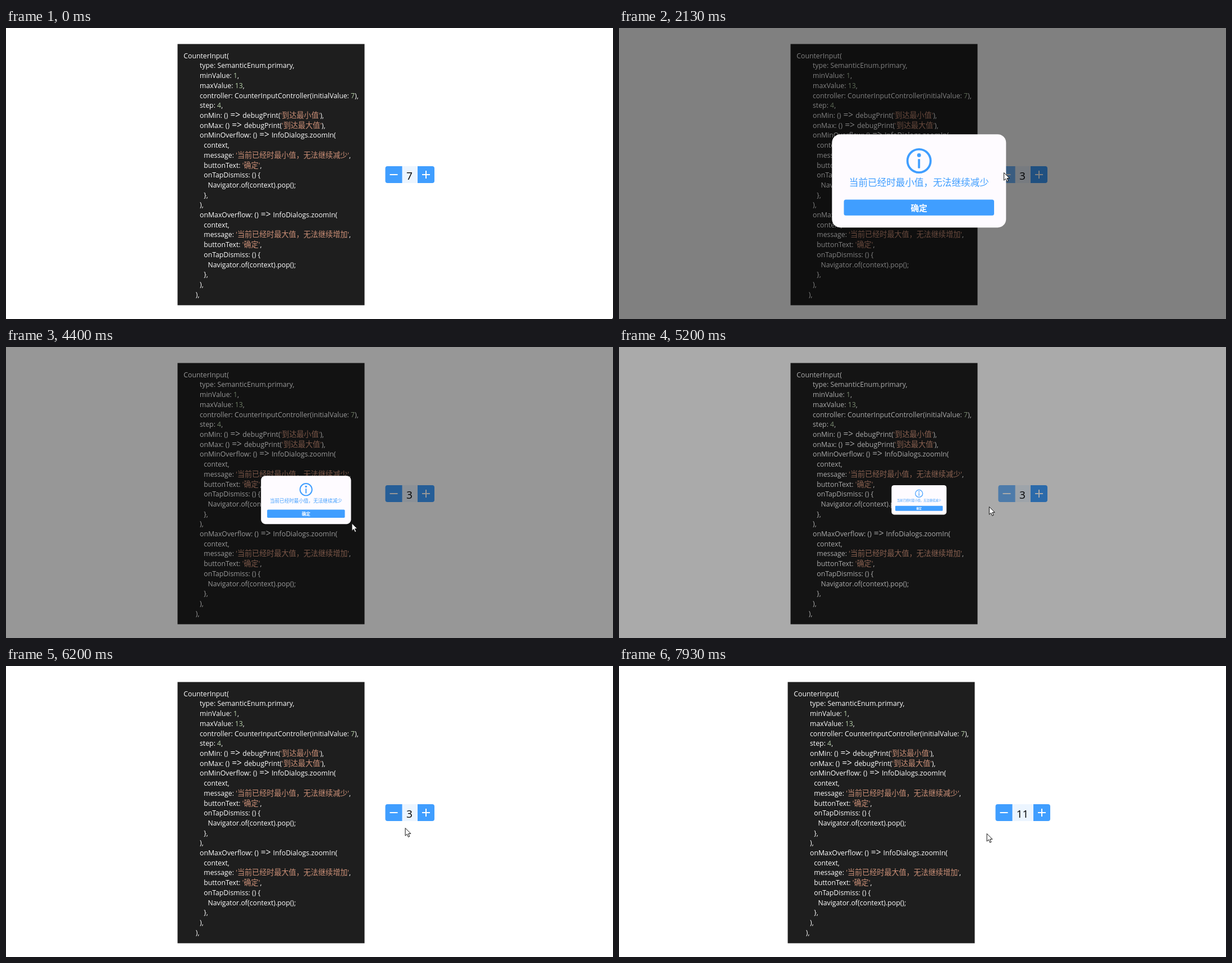
Animation of 1081 by 518 pixels, one loop 8000 ms. Source, as an HTML page with a canvas:

```html
<!DOCTYPE html>
<html lang="zh-CN">
<head>
<meta charset="utf-8">
<title>CounterInput</title>
<style>
  html, body { margin: 0; width: 100%; height: 100%; overflow: hidden; background: #fff; }
  canvas { display: block; }
</style>
</head>
<body>
<canvas id="stage" width="1081" height="518"></canvas>
<script>
const ctx = document.getElementById('stage').getContext('2d');
const LOOP = 8000, FADE = 200;
const BLUE = '#409eff', LATIN = '"Open Sans", sans-serif';
const CJK = '"Noto Sans CJK SC", "Noto Sans CJK", sans-serif';
const MIN_TEXT = '当前已经时最小值，无法继续减少';
const MAX_TEXT = '当前已经时最大值，无法继续增加';

const overflowCode = (name, message) => `        ${name}: () => InfoDialogs.zoomIn(
          context,
          message: '${message}',
          buttonText: '确定',
          onTapDismiss: () {
            Navigator.of(context).pop();
          },
        ),`;
const code = `CounterInput(
        type: SemanticEnum.primary,
        minValue: 1,
        maxValue: 13,
        controller: CounterInputController(initialValue: 7),
        step: 4,
        onMin: () => debugPrint('到达最小值'),
        onMax: () => debugPrint('到达最大值'),
${overflowCode('onMinOverflow', MIN_TEXT)}
${overflowCode('onMaxOverflow', MAX_TEXT)}
      ),`.split('\n');

// Token styles: pattern, font, color; the last one is the fallback.
const tokenStyles = [
  [/^[\u4e00-\u9fff]/, '13.1px ' + CJK, '#ce9178'],
  [/^'/, '12.3px ' + LATIN, '#ce9178'],
  [/^\d/, '12.3px ' + LATIN, '#b5cea8'],
  [/^ =>/, '15.5px ' + LATIN, '#fff'],
  [/^/, '12.3px ' + LATIN, '#fff'],
];

const dialogs = [
  { open: 1870, close: 2260, message: MIN_TEXT },
  { open: 3360, close: 4302, message: MIN_TEXT },
  { open: 5122, close: 5930, message: MIN_TEXT },
  { open: 7230, close: 7670, message: MAX_TEXT },
];
const taps = {
  minus: [1670, ...dialogs.slice(0, 3).map(d => d.open)],
  plus: [6800, 7000, dialogs[3].open],
};

// Pointer trips: each leaves the previous place at start and reaches its own at end.
const corner = [1080, 516], overCode = [557, 227], below = [685, 270];
const minus = [685, 257], plus = [748, 262], ok = [540, 318];
const trips = [
  { start: 0, end: 0, place: corner },
  { start: 50, end: 600, place: overCode },
  { start: 500, end: 1130, place: minus },
  { start: 2130, end: 2300, place: ok },
  { start: 2500, end: 3470, place: minus },
  { start: 3400, end: 3870, place: ok },
  { start: 4200, end: 5120, place: minus },
  { start: 5150, end: 5930, place: ok },
  { start: 5930, end: 6550, place: plus },
  { start: 7230, end: 7600, place: ok },
  { start: 7670, end: 8310, place: below },
];
const SAG = 27;

const clamp = v => Math.max(0, Math.min(1, v));
const lerp = (a, b, u) => a + (b - a) * u;
const easeOut = v => 1 - (1 - v) ** 3;

function bezier(x1, y1, x2, y2) {
  const at = (a, b, s) => 3 * a * s * (1 - s) ** 2 + 3 * b * s * s * (1 - s) + s ** 3;
  return x => {
    let low = 0, high = 1;
    for (let i = 0; i < 20; i++) {
      const mid = (low + high) / 2;
      if (at(x1, x2, mid) < x) low = mid; else high = mid;
    }
    return at(y1, y2, low);
  };
}
const ease = bezier(.25, .1, .25, 1), easeInOut = bezier(.42, 0, .58, 1);

function box(x, y, w, h, color, radius = 0) {
  ctx.fillStyle = color;
  ctx.beginPath();
  ctx.roundRect(x, y, w, h, radius);
  ctx.fill();
}

function label(text, x, y, font, color, align = 'center') {
  ctx.font = font;
  ctx.fillStyle = color;
  ctx.textAlign = align;
  ctx.fillText(text, x, y);
}

function drawCode() {
  box(305.5, 28.5, 333, 465, '#1e1e1e');
  code.forEach((line, row) => {
    const text = line.trimStart();
    let x = 316.2 + (line.length - text.length) * 3.6;
    for (const token of text.split(/(\d+|'|[\u4e00-\u9fff，]+| => )/)) {
      const [, font, color] = tokenStyles.find(([pattern]) => pattern.test(token));
      label(token, x, 53.7 + row * 17.71, font, color, 'left');
      x += ctx.measureText(token).width;
    }
  });
}

const tapGlow = (times, t) =>
  Math.max(0, ...times.map(tap => t < tap ? 0 : .27 * clamp((550 - t + tap) / 300)));

function drawCounter(value, t) {
  const half = value > 9 ? 48.75 : 43.75, left = 719.25 - half, right = 719.25 + half;
  const button = (x, corners, times) => {
    box(x, 246, 30, 30, BLUE, corners);
    box(x, 246, 30, 30, `rgba(255,255,255,${tapGlow(times, t)})`, corners);
    box(x + 8, 260, 14, 2, '#fff');
  };
  box(left + 29, 246, 2 * half - 58, 30, '#ecf5ff');
  button(left, [4, 0, 0, 4], taps.minus);
  button(right - 30, [0, 4, 4, 0], taps.plus);
  box(right - 16, 254, 2, 14, '#fff');
  label(value, 718.5, 270, '19px ' + LATIN, '#000');
}

function drawDialog({ open, close, message }, t) {
  const progress = clamp(Math.min(t - open, close + FADE - t) / FADE);
  box(0, 0, 1081, 518, `rgba(0,0,0,${ease(progress) / 2})`);
  const scale = easeInOut(progress);
  ctx.save();
  ctx.translate(534.3, 272.2);
  ctx.scale(scale, scale);
  box(-155, -83, 310, 166, '#fefbff', 15);
  ctx.strokeStyle = BLUE;
  ctx.lineWidth = 3.8;
  ctx.beginPath();
  ctx.arc(0, -35.7, 20.6, 0, 7);
  ctx.stroke();
  box(-3.4, -49.2, 6.8, 6.8, BLUE, 3.4);
  box(-1.9, -39, 3.8, 16.5, BLUE, 1);
  label(message, 0, 9, '16.6px ' + CJK, BLUE);
  box(-133.8, 33.3, 267.5, 28.2, BLUE, 3.5);
  label('确定', 0, 53.3, 'bold 14.8px ' + CJK, '#fff');
  ctx.restore();
}

const arrowShape = new Path2D('M.5 .5V14.2L3.7 11.2L5.9 16.4L8.2 15.4L6 10.4H10.3Z');
const handShape = new Path2D('M-1.5 1.6Q0 -.4 1.5 1.6V7.2Q3.4 6 4.4 7.8Q6.4 6.8 7.3 8.5' +
  'Q9.8 7.8 10 10.4V14Q9.8 17 8.2 19.5H0Q-1.2 16.8 -4.6 12.6Q-5 10 -2.9 10.4L-1.5 12Z');

function pointerAt(t) {
  const i = Math.max(1, trips.findLastIndex(trip => t >= trip.start));
  const { start, end, place: [x1, y1] } = trips[i];
  const [x0, y0] = trips[i - 1].place;
  const u = easeOut(clamp((t - start) / (end - start)));
  return [lerp(x0, x1, u), lerp(y0, y1, u) + SAG * 4 * u * (1 - u)];
}

function drawPointer(t, dialog) {
  const [x, y] = pointerAt(t);
  const inside = (left, top, right, bottom) => x >= left && x <= right && y >= top && y <= bottom;
  const hand = dialog ? t < dialog.close && inside(400, 305, 668, 334)
    : inside(675, 246, 706, 276) || inside(733, 246, 768, 276);
  const shape = hand ? handShape : arrowShape;
  ctx.save();
  ctx.translate(x, y);
  ctx.fillStyle = '#fff';
  ctx.strokeStyle = '#111';
  ctx.lineWidth = 1;
  ctx.lineJoin = 'round';
  ctx.fill(shape);
  ctx.stroke(shape);
  if (hand) {
    ctx.beginPath();
    for (const finger of [1.5, 4.4, 7.3]) {
      ctx.moveTo(finger, 7.5);
      ctx.lineTo(finger, 11);
    }
    ctx.stroke();
  }
  ctx.restore();
}

function draw(now) {
  const t = now % LOOP;
  const value = t < taps.minus[0] ? 7 : t < taps.plus[0] ? 3 : t < taps.plus[1] ? 7 : 11;
  const dialog = dialogs.find(d => t > d.open && t < d.close + FADE);
  box(0, 0, 1081, 518, '#fff');
  ctx.save();
  if (value > 9) ctx.translate(-5, 0);
  drawCode();
  ctx.restore();
  drawCounter(value, t);
  if (dialog) drawDialog(dialog, t);
  drawPointer(t, dialog);
}

let start;
function frame(now) {
  start ??= now;
  draw(Math.max(0, now - start));
  requestAnimationFrame(frame);
}
requestAnimationFrame(frame);
</script>
</body>
</html>
```
